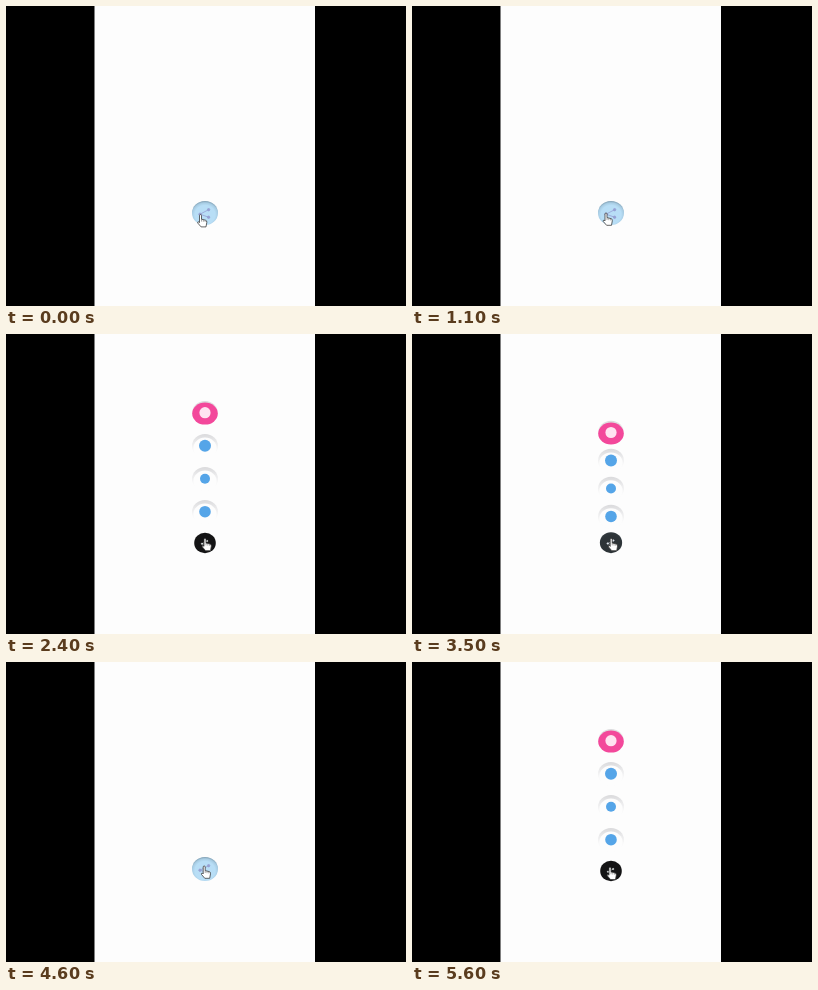
Recreate the animation shown at these times as an HTML page. Size 400 by 300 pixels, loop 5.8 s.

```html
<!DOCTYPE html>
<html lang="en">
<head>
<meta charset="utf-8">
<title>Share menu</title>
<style>
  html, body { margin: 0; width: 100%; height: 100%; overflow: hidden; background: #000; }
  svg { display: block; width: 100%; height: 100%; }
</style>
</head>
<body>
<svg viewBox="0 0 400 300">
  <defs>
    <linearGradient id="rim" x1="0" y1="0" x2="0" y2="1">
      <stop offset="0" stop-color="#dadadc"/>
      <stop offset=".45" stop-color="#f0f0f1"/>
      <stop offset=".8" stop-color="#fdfdfd"/>
    </linearGradient>
    <radialGradient id="shade" cx=".5" cy=".57" r=".57">
      <stop offset=".68" stop-color="#6d8ea2" stop-opacity="0"/>
      <stop offset=".86" stop-color="#6d8ea2" stop-opacity=".22"/>
      <stop offset="1" stop-color="#5d7482" stop-opacity=".65"/>
    </radialGradient>
    <filter id="soft" x="-20%" y="-20%" width="140%" height="140%">
      <feGaussianBlur stdDeviation=".7"/>
    </filter>
  </defs>
  <rect width="400" height="300" fill="#000"/>
  <rect x="88.5" width="220.5" height="300" fill="#fdfdfd"/>
  <g id="items"></g>
  <g id="main">
    <ellipse id="disc"/>
    <ellipse id="gloss" fill="url(#shade)"/>
    <g id="share" stroke-width=".8">
      <path d="M3.6 -3.3L-5 1.2L3.6 4.2" fill="none"/>
      <circle cx="3.6" cy="-3.3" r="1.2"/>
      <circle cx="-5" cy="1.2" r="1.2"/>
      <circle cx="3.6" cy="4.2" r="1.2"/>
    </g>
  </g>
  <g id="hand">
    <path d="M-1 8V1a1 1 0 0 1 2 0V4.6L5 5.6Q6.6 6 6.3 7.8L5.5 12.3H.6L-2.7 8.5Q-3.2 7 -1.8 7.2Z"
      fill="#fff" stroke="#333" stroke-width=".75" stroke-linejoin="round"/>
    <path d="M1 4.6V7M2.8 5.2V7.2M4.6 5.7V7.4" stroke="#555" stroke-width=".5"/>
  </g>
</svg>
<script>
const LOOP = 5800, STEP = 100, MOVE = 600;
const CX = 199, HOME = 209;
const $ = id => document.getElementById(id);
const mix = (a, b, k) => a + (b - a) * k;
const rgb = (a, b, k) => `rgb(${a.map((v, i) => Math.round(mix(v, b[i], k)))})`;

function add(parent, tag, attrs) {
  const node = document.createElementNS('http://www.w3.org/2000/svg', tag);
  set(node, attrs);
  return parent.appendChild(node);
}
function set(node, attrs) {
  for (const key in attrs) node.setAttribute(key, attrs[key]);
}

// Open position, face colour, badge colour, badge radius
const items = [
  [79, '#f3489b', '#ffe3f1', 5.6],
  [112, '#fdfdfd', '#55a5e8', 6],
  [145, '#fdfdfd', '#55a5e8', 5],
  [178, '#fdfdfd', '#55a5e8', 5.8]
].map(([y, face, badge, r]) => {
  const g = add($('items'), 'g', {});
  add(g, 'ellipse', { rx: 13, ry: 12, fill: 'url(#rim)' });
  add(g, 'ellipse', face === '#fdfdfd'
    ? { cy: 2, rx: 11.6, ry: 10.4, fill: face, filter: 'url(#soft)' }
    : { cy: .6, rx: 12.8, ry: 11, fill: face });
  add(g, 'circle', { r, cy: -.3, fill: badge });
  return { g, y };
});

// CSS "ease": cubic-bezier(.25, .1, .25, 1)
function ease(x) {
  if (x <= 0) return 0;
  if (x >= 1) return 1;
  const curve = (a, b, u) => 3 * a * u * (1 - u) ** 2 + 3 * b * u * u * (1 - u) + u ** 3;
  let lo = 0, hi = 1;
  for (let i = 0; i < 24; i++) {
    const mid = (lo + hi) / 2;
    if (curve(.25, .25, mid) < x) lo = mid; else hi = mid;
  }
  return curve(.1, 1, lo);
}

const run = (t, start) => ease((t - start) / MOVE);
const openness = t => run(t, 1620) - run(t, 3420) + run(t, 4620);

// Time, x and y of the fingertip
const track = [
  [0, 194.5, 208.6], [400, 194.5, 208], [1100, 194, 207], [1500, 198, 204],
  [1600, 198.2, 204], [2400, 199, 204.4], [3500, 199.2, 204.4],
  [4600, 198.2, 204], [5600, 198, 205.3], [LOOP, 198, 205.3]
];
function tip(t) {
  const i = track.findIndex(p => p[0] > t);
  const [a, b] = [track[i - 1], track[i]];
  const k = (t - a[0]) / (b[0] - a[0]);
  return [mix(a[1], b[1], k), mix(a[2], b[2], k)];
}

function draw(t) {
  const k = openness(t);
  for (const { g, y } of items) {
    set(g, {
      transform: `translate(${CX} ${mix(HOME, y, k)})`,
      visibility: k > 0 ? 'visible' : 'hidden'
    });
  }
  const size = { rx: mix(13, 10.8, k), ry: mix(12, 10.2, k) };
  set($('main'), { transform: `translate(${CX} ${mix(207, 209, k)})` });
  set($('disc'), { ...size, fill: rgb([184, 222, 246], [20, 20, 21], k) });
  set($('gloss'), { ...size, opacity: 1 - k });
  const ink = rgb([150, 160, 212], [235, 240, 240], k);
  set($('share'), { fill: ink, stroke: ink, transform: `scale(${mix(1, .6, k)})` });
  set($('hand'), { transform: `translate(${tip(t).join(' ')})` });
}

const origin = performance.now();
function tick() {
  const t = (performance.now() - origin) % LOOP;
  draw(Math.floor(t / STEP) * STEP);
  requestAnimationFrame(tick);
}
tick();
</script>
</body>
</html>
```
